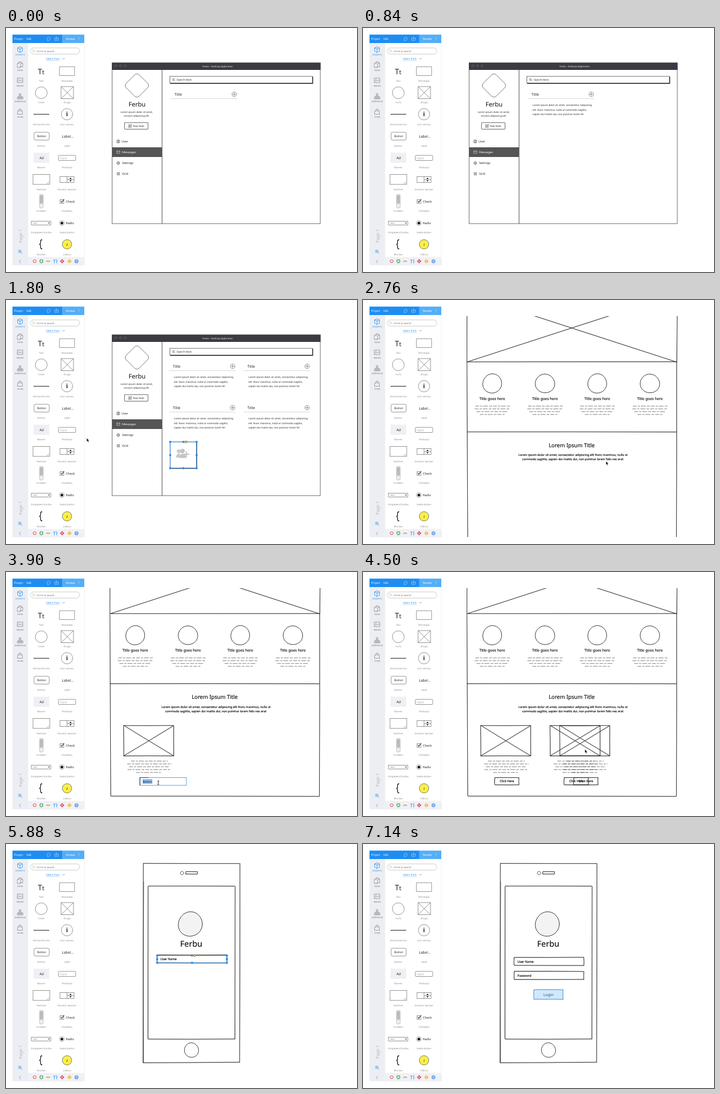
Recreate the animation shown at these times as an HTML page. Size 650 by 454 pixels, loop 7.2 s.

```html
<!DOCTYPE html>
<html lang="en">
<head>
<meta charset="utf-8">
<title>Wireframe demo</title>
<style>
html, body { margin: 0; width: 100%; height: 100%; overflow: hidden; background: #fff; }
svg { display: block; width: 100vw; height: 100vh; font-family: "Noto Sans", "Open Sans", sans-serif; text-rendering: geometricPrecision; }
</style>
</head>
<body>
<svg id="stage" viewBox="0 0 650 454" xmlns="http://www.w3.org/2000/svg"></svg>
<script>
const LOOP = 7200, INK = '#222', BLUE = '#2089ea', BRAND = 'Ferbu';

// Markup helpers
const tag = (name, attrs, style = '') => `<${name} ${attrs} ${style}/>`;
const stroke = (c = INK, w = .8, f = 'none') => `fill="${f}" stroke="${c}" stroke-width="${w}"`;
const rect = (x, y, w, h, s, r = 0) => tag('rect', `x="${x}" y="${y}" width="${w}" height="${h}" rx="${r}"`, s);
const circ = (x, y, r, s) => tag('circle', `cx="${x}" cy="${y}" r="${r}"`, s);
const path = (d, s = stroke()) => tag('path', `d="${d}"`, s);
const fill = c => `fill="${c}"`;
const text = (x, y, size, str, color = INK, anchor = 'start', extra = '') =>
  `<text x="${x}" y="${y}" font-size="${size}" fill="${color}" text-anchor="${anchor}" ${extra}>${str}</text>`;
const mid = (x, y, size, str, color, extra) => text(x, y, size, str, color, 'middle', extra);
const hand = (x, y, size, str, anchor = 'middle') => text(x, y, size, str, '#111', anchor, 'stroke="#111" stroke-width=".18"');
const group = (id, body) => `<g id="${id}">${body}</g>`;
const MEDIUM = 'font-weight="500"';

// Hand-drawn strokes
let seed = 7;
const rnd = () => (seed = seed * 16807 % 2147483647) / 2147483647;
const jit = a => (rnd() * 2 - 1) * a;
function rough(x1, y1, x2, y2, c = INK, w = .9) {
  const d = a => `M${x1 + jit(a)} ${y1 + jit(a)}Q${(x1 + x2) / 2 + jit(.8)} ${(y1 + y2) / 2 + jit(.8)} ${x2 + jit(a)} ${y2 + jit(a)}`;
  return path(d(.3), stroke(c, w)) + path(d(.6), stroke(c, w * .4));
}
function roughRect(x, y, w, h, c, lw) {
  return rough(x, y, x + w, y, c, lw) + rough(x + w, y, x + w, y + h, c, lw) +
    rough(x + w, y + h, x, y + h, c, lw) + rough(x, y + h, x, y, c, lw);
}
function roughCirc(x, y, r, f = 'none') {
  const ph = rnd() * 6;
  let d = '';
  for (let i = 0; i <= 40; i++) {
    const a = i / 40 * Math.PI * 2, q = r * (1 + .02 * Math.sin(2 * a + ph) + .01 * Math.sin(3 * a));
    d += `${i ? 'L' : 'M'}${(x + q * Math.cos(a)).toFixed(2)} ${(y + q * Math.sin(a)).toFixed(2)}`;
  }
  return path(d + 'Z', stroke(INK, .95, f));
}
function squiggle(cx, y, w) {
  let d = `M${cx - w / 2} ${y}`;
  for (let x = 0; x < w; x += 2) d += `q.5 ${jit(.7).toFixed(2)} 1 0t1 0`;
  return path(d, stroke('#333', .75) + ' stroke-dasharray="7 2 4 1.8 9 2.2 5 2"');
}

function palette() {
  const grey = '#777', thin = stroke('#555', .65), icon = stroke('#777', .7), white = stroke('#e6f3ff', .55);
  let s = rect(12, 12, 133, 429, fill('#fff')) + rect(12, 28, 29, 413, fill('#eceef3')) +
    rect(41, 427, 104, 14, fill('#f0f1f6')) + path('M145 28V441M41 427H145M12 441H145', stroke('#e2e4ea', .6)) +
    rect(12, 12.3, 92, 15.7, fill('#1e8df2')) + rect(104, 12.3, 41, 15.7, fill('#55aef8'));
  s += text(15, 21.7, 5.1, 'Project', '#fff') + text(38, 21.7, 5.1, 'Edit', '#fff') + text(111, 21.7, 5.1, 'Review', '#fff');
  s += path('M77.3 22.3a3 2.7 0 1 1 1.8 .4l-2.3 1ZM91.3 18h-1v5h6.4v-5h-1M93.5 15.5v5m-1.8-1.8 1.8 1.8 1.8-1.8M134 17.5l2 2-2 2', white);
  // Side rail
  s += path('M26 35l4.5 2v6L26 45.5l-4.5-2.5v-6ZM21.5 37l4.5 2 4.5-2M26 39v6.5', stroke(BLUE, .8));
  s += path('M24 66v-3h4l3 3v6h-5M21 65.5h4l2 2v6h-6ZM28 63v3h3', icon);
  s += rect(21, 93, 10, 8.5, icon) + path('M21 100l3-3 2 2 2.5-3 2.5 3', icon) + circ(24, 95.5, .7, fill(grey));
  s += path('M24.5 122h3v3h-3ZM21 129h3v3h-3ZM24.7 129h3v3h-3ZM28.5 129h3v3h-3ZM26 125v4M22.5 129v-2h7.5v2', icon);
  s += path('M22 154h8l.8 6.5h-9.6ZM24 154v-1.5a2 2 0 0 1 4 0v1.5', icon);
  [['ELEMENTS', 51.3], ['PAGES', 80.3], ['IMAGES', 109.3], ['WORKFLOW', 138.3], ['STORE', 167.3]]
    .forEach(([l, y], i) => s += mid(26.3, y, 3.6, l, i ? '#666' : BLUE));
  s += text(0, 0, 8, 'Page 1', '#b4b6bc', 'middle', 'transform="translate(29.5 387) rotate(-90)"');
  s += circ(25.5, 415.5, 2.6, stroke(BLUE, .7)) + path('M27.5 417.5l2.5 2.5M24.3 415.5h2.4M25.5 414.3v2.4M27.5 431.5l-3 3 3 3', stroke(BLUE, .7));
  // Search
  s += rect(45.5, 37, 91, 11.5, stroke('#aaa', .6), 5.7) + circ(51, 42.5, 1.6, stroke('#999', .5)) + path('M52.2 43.7l1.5 1.5', stroke('#999', .5));
  s += text(56.5, 44.6, 4.4, 'Ctrl+K to Search', '#666') + text(74, 59, 4.8, 'Select Pack', BLUE) +
    path('M74 60.8h25', stroke(BLUE, .5) + ' stroke-dasharray="1 .6"') + path('M104.5 56l2.2 2.2 2.2-2.2', stroke(BLUE, .7));
  // Elements
  const names = ['Text', 'Rectangle', 'Circle', 'Image', 'Horizontal Line', 'Icon Library', 'Button', 'Label', 'Banner',
    'TextInput', 'TextArea', 'Numeric Spinner', 'ScrollBar', 'CheckBox', 'Dropdown/Combo', 'Radio Button', 'Bracket', 'Callout'];
  names.forEach((n, i) => s += mid(i % 2 ? 113 : 65.3, 100 + (i >> 1) * 40.35, 4.4, n, '#888'));
  s += text(59, 86, 14, 'T', INK, 'start', MEDIUM) + text(67, 86, 11, 't', INK, 'start', MEDIUM);
  s += rect(99, 72, 28, 16.5, thin) + circ(65.3, 120.5, 11, thin) + rect(102, 109, 23, 22.5, thin) + path('M102 109l23 22.5m0-22.5l-23 22.5', thin);
  s += path('M51 160.5H80', stroke(INK, 1.1)) + circ(113, 160.5, 10.5, thin) + mid(113, 164.3, 11, 'i', INK, 'font-weight="600"');
  s += rect(52, 194, 28, 14.5, thin, 2.5) + mid(66, 203.3, 5.2, 'Button', INK, MEDIUM) + text(103.5, 204, 6.5, 'Label...');
  s += rect(51, 232, 29, 19, fill('#eef0f4')) + mid(66, 243.5, 6.3, 'Ad') + rect(97, 237, 32, 9.5, thin, 1.5) + text(100, 243.5, 5.1, 'Input', '#aaa');
  s += rect(50, 272.5, 31, 18.5, thin) + path('M79.5 286l-4 4m4-2l-2 2', stroke('#888', .6));
  s += rect(100, 276.5, 26, 11, thin) + path('M113 276.5v11m0-5.5h13', thin) + path('M117.5 281l2-2.7 2 2.7ZM117.5 283.3l2 2.7 2-2.7Z', fill(INK));
  s += rect(62, 309.5, 7, 25.5, stroke('#999', .6, '#eee'), 3) + rect(62.5, 311, 6, 16, fill('#bbb'), 2.5);
  s += rect(100, 319.5, 7, 7, thin) + path('M101.5 322l2 2.5 4-6', stroke(INK, 1.1)) + text(111, 325, 5.8, 'Check');
  s += rect(47, 359.5, 36, 7, thin) + text(50, 364, 3, 'Select', '#555') + path('M78 362h3l-1.5 2.2Z', fill(INK));
  s += circ(103.5, 363, 4.3, thin) + circ(103.5, 363, 2.5, fill('#111')) + text(111, 365, 5.6, 'Radio');
  s += path('M67 394q-3 0-3 3v2.5q0 2.5-2 3 2 .5 2 3v2.5q0 3 3 3', stroke('#111', 1.3));
  s += circ(113, 402.5, 8.7, stroke('#555', .8, '#fdf04a')) + mid(113, 404.6, 5.5, '2');
  // Toolbar
  s += rect(50.5, 431.5, 5, 5, stroke('#e04646', 1), 1) + circ(65.5, 434, 2.8, stroke('#35a04a', 1.2)) + path('M74.5 434h7', stroke('#eb9b2d', 1.8));
  s += text(87, 437.5, 9.5, 'T', BLUE, 'start', MEDIUM) + path('M94 430.5v7', stroke(BLUE, 1));
  [[0, -2.3], [-2.3, 0], [2.3, 0], [0, 2.3]].forEach(([x, y]) => s += path(`M${104 + x} ${432.3 + y}l1.7 1.7-1.7 1.7-1.7-1.7Z`, fill('#d8324e')));
  return s + circ(117.5, 434, 2.8, stroke('#ecaa3c', 1, '#f8d27c')) + circ(130.5, 434, 2.8, stroke('#2f6fe0', 1.1)) + circ(130.5, 434, 1, fill('#2f6fe0'));
}

function noteBody() {
  return ['Lorem ipsum dolor sit amet, consectetur adipiscing', 'elit. Nunc maximus, nulla ut commodo sagittis,',
    'sapien dui mattis dui, non pulvinar lorem fel'].map((l, i) => text(314, 145.4 + i * 8.2, 4.57, l)).join('');
}
function noteHead() {
  return text(312, 125.5, 7, 'Title', INK, 'start', MEDIUM) + circ(422.7, 123.3, 4.2, stroke('#555', .7)) +
    path('M420 123.3h5.4M422.7 120.6v5.4', stroke('#555', .7)) + path('M305 131.5H428', stroke('#bbb', .6));
}

function desktop() {
  const fine = stroke(INK, .6);
  let s = rect(196.5, 65, 385.5, 299, stroke('#555', .9, '#fff')) + rect(196, 64.5, 386.5, 13.5, fill('#3b3b43'));
  [203.5, 212, 220.5].forEach(x => s += circ(x, 70.3, 1.9, stroke('#777', .6)));
  s += mid(392, 72.8, 4.3, BRAND + ' - Desktop Application', '#eee') + path('M289 78V364', stroke('#444', 1));
  s += rect(-17, -17, 34, 34, stroke('#555', .8) + ' transform="translate(242.5 107) rotate(45)"', 6);
  s += mid(242.8, 145.5, 11.5, BRAND, '#111') + mid(242, 157.5, 4.5, 'Lorem ipsum dolor sit amet,') + mid(242, 165.3, 4.5, 'consect adipiscing elit.');
  s += rect(219.5, 176, 43.5, 12.3, stroke('#333'), .8) + text(235, 184, 4.5, 'New Note', INK, 'start', MEDIUM) +
    path('M230 180h-3v5h5v-3M228.5 183.5l.5-1.5 3-3 1 1-3 3Z', fine);
  s += rect(196.5, 222, 92.5, 18, fill('#555'));
  s += circ(207.8, 211, 3, fine) + circ(207.8, 210.2, 1.1, fine) + path('M205.8 213.2q2-2 4 0', fine);
  s += path('M205 228.7h6v4.6h-6Zl3 2.6 3-2.6', stroke('#ddd', .6));
  s += circ(207.8, 251.3, 2.7, stroke(INK, 1) + ' stroke-dasharray="1.3 .8"') + circ(207.8, 251.3, 1.3, fine);
  for (let i = 0; i < 3; i++) s += path(`M205.3 ${269.2 + i * 2}h5.5`, stroke(INK, 1) + ' stroke-dasharray="1.4 .6"');
  [['User', 211], ['Messages', 231], ['Settings', 251], ['Grid', 271]].forEach(([l, y], i) =>
    s += text(i ? 215 : 214, y + 2.2, 5.5, l, i == 1 ? '#fff' : INK, 'start', MEDIUM));
  s += rect(303.5, 90, 264, 12.5, stroke('#444', .8)) + path('M304 103H568V90.5', stroke(INK, 1.3));
  s += circ(310, 95.7, 1.7, fine) + path('M311.2 97l1.8 1.8', fine) + text(316, 98.2, 4.9, 'Search Here');
  s += group('head', noteHead()) + group('body', noteBody());
  for (const id of ['note2', 'note3', 'note4']) s += group(id, noteHead() + noteBody());
  s += group('tile', rect(304, 264, 49, 49, stroke('#555', .7, '#fff')) + path('M304 313.3H353.3V264', stroke(INK, 1.2)));
  s += group('people', circ(320, 281.5, 3.7, fill('#ccc')) + circ(327, 281, 4.2, fill('#c4c4c4')) +
    path('M315 293q0-6 5-7h3q-3 3-3 7ZM320.5 294q0-7 6.5-8 6.5 1 6.5 8Z', fill('#c4c4c4')) + path('M334 281.5v11M328.5 287h11', stroke('#c4c4c4', 2.2)));
  return s + rect(0, 0, 0, 0, 'id="marquee" ' + stroke(BLUE, .6, '#2089ea18'));
}

function cardParts() {
  const img = roughRect(218, 285.7, 92.5, 56.5) + rough(218, 285.7, 310.5, 342.2) + rough(310.5, 285.7, 218, 342.2);
  const lines = [67, 81, 74, 80, 48].map((w, i) => squiggle(265, 351.8 + i * 5.3, w)).join('');
  const button = roughRect(244, 382.5, 45, 13.5) + hand(266.5, 391.4, 5.7, 'Click Here');
  return [img, lines, button];
}

function landing() {
  let s = rough(193, -49, 192.3, 77.5) + rough(192.3, 77.5, 194, 417) + rough(582, -49, 581, 77.5) + rough(581, 77.5, 580.3, 417) +
    rough(194, 417.3, 580.3, 417.3) + rough(193, -49, 581, -49) + rough(193, 77.6, 581, 77.3) +
    rough(193, 77.8, 581, -48.5) + rough(581, 77.8, 193, -48.5) + rough(192.5, 207.7, 580.5, 208);
  [239.3, 337, 433.8, 531.3].forEach(x => {
    s += roughCirc(x, 117.8, 17.7) + hand(x, 148, 6.9, 'Title goes here');
    [63, 65, 58, 46].forEach((w, i) => s += squiggle(x, 159.8 + i * 5.2, w));
  });
  s += group('intro', hand(386.5, 236, 10, 'Lorem Ipsum Title') +
    hand(389, 252.8, 5.44, 'Lorem ipsum dolor sit amet, consectetur adipiscing elit Nunc maximus, nulla ut') +
    hand(388.5, 260.8, 5.44, 'commodo sagittis, sapien dui mattis dui, non pulvinar lorem felis nec erat'));
  const [img, lines, button] = cardParts();
  s += group('img', img) + group('lines', lines) + group('button', button);
  s += group('edit', rect(248, 382.5, 86, 14.5, stroke('#4f9fe0', 1, '#fff')) + path('M248 397V382.5h16', stroke(INK, .9)) +
    rect(253, 385.5, 18, 8.5, 'id="mark" ' + fill('#86b9e6')) + '<text id="typed" x="253.5" y="392" font-size="5.2" fill="#222"></text>');
  for (const id of ['card2', 'card3']) s += group(id, img + lines + button);
  return s;
}

function phone() {
  let s = rough(254, 36, 433, 36.5) + rough(433, 36, 433, 406) + rough(433, 406, 254, 407) + rough(254.5, 407, 254, 36) + rough(255, 70, 253.5, 407, INK, .5);
  s += roughRect(263, 78.5, 161, 284.5) + roughCirc(326, 54, 3) + roughRect(333, 51.5, 21.5, 4.5) + roughCirc(343.5, 383.5, 13.3);
  s += group('avatar', roughCirc(341.3, 149, 22.5, 'url(#hatch)')) + group('name', hand(343, 191, 15, BRAND));
  [['user', 'User Name', 211], ['pass', 'Password', 237]].forEach(([id, l, y]) =>
    s += group(id, roughRect(280, y, 129, 15) + hand(286, y + 9.6, 5.7, l, 'start')));
  return s + group('login', rect(316.5, 271, 54, 18, 'id="tint" fill="url(#blueHatch)"') + group('plain', roughRect(316.5, 271, 54, 18)) +
    group('blue', roughRect(316.5, 271, 54, 18, '#3d8fdc')) + mid(343.5, 283.3, 7.3, 'Login', '#2a5c90'));
}

const hatch = (id, bg, c) => `<pattern id="${id}" width="2.4" height="2.4" patternUnits="userSpaceOnUse" patternTransform="rotate(45)">` +
  rect(0, 0, 2.4, 2.4, fill(bg)) + rect(0, 0, .6, 2.4, fill(c)) + '</pattern>';
const handles = [[0, 0], [.5, 0], [1, 0], [0, .5], [1, .5], [0, 1], [.5, 1], [1, 1]];

document.getElementById('stage').innerHTML =
  `<defs>${hatch('hatch', '#fafafa', '#dedede')}${hatch('blueHatch', '#e2f0fc', '#a5cff3')}<clipPath id="view">${rect(150, 30, 500, 411, '')}</clipPath></defs>` +
  rect(0, 0, 650, 454, fill('#fff')) + palette() + group('desktop', desktop()) +
  `<g clip-path="url(#view)">${group('landing', landing())}</g>` + group('phone', phone()) +
  group('sel', rect(0, 0, 1, 1, 'id="frame" ' + stroke(BLUE, .8)) + handles.map(() => circ(0, 0, 2, fill(BLUE))).join('') +
    circ(0, 0, 2, stroke('#8a6a10', .8, '#f5c52c'))) +
  group('arrow', path('M0 0V6.5L1.6 5.2 2.7 7.7 3.8 7.2 2.7 4.8H4.6Z', fill('#111') + ' stroke="#fff" stroke-width=".3"')) +
  group('beam', path('M-1.5-3.2h3M0-3.2v6.4M-1.5 3.2h3', stroke('#111', .9)));

// Time helpers
const ui = {};
document.querySelectorAll('[id]').forEach(e => ui[e.id] = e);
const show = (id, on) => ui[id].style.display = on ? '' : 'none';
const at = (id, x, y) => ui[id].setAttribute('transform', `translate(${x} ${y})`);
const set = (e, o) => { for (const k in o) e.setAttribute(k, o[k]); };
const ramp = (t, a, b) => { const p = Math.min(1, Math.max(0, (t - a) / (b - a))); return p * p * (3 - 2 * p); };
const within = (t, a, b) => t >= a && t < b;

function drag(id, t, a, b, dx, dy) {
  const k = 1 - ramp(t, a, b);
  show(id, t >= a);
  at(id, dx * k, dy * k);
}

function select(x, y, w, h) {
  set(ui.frame, { x, y, width: w, height: h });
  ui.sel.querySelectorAll('circle').forEach((c, i) => {
    const [u, v] = handles[i] || [.5, 0];
    set(c, { cx: x + w * u + (i > 7 ? 4.8 : 0), cy: y + h * v });
  });
}

// Cursor stops: time, x, y
const moves = [[90, 190, 170], [240, 66, 82], [300, 66, 82], [540, 366, 153], [780, 400, 190],
  [870, 301, 111], [1010, 431, 168], [1050, 366, 124], [1110, 363, 124], [1230, 501, 124], [1260, 430, 135], [1380, 430, 212],
  [1440, 113, 82], [1560, 328, 289], [1690, 328, 289], [1800, 149.5, 257], [1920, 113, 160], [2160, 113, 160],
  [2170, 400, 220], [2400, 450, 300], [3300, 450, 300], [3360, 113, 122], [3500, 264, 314], [3560, 65, 82], [3680, 265, 364],
  [3740, 66, 202], [3840, 290, 390], [3870, 282, 392], [4130, 282, 392], [4200, 265, 330], [4400, 393, 330], [4450, 393, 330],
  [4660, 514, 330], [4860, 369, 281], [5340, 369, 281], [5400, 65, 122], [5520, 341, 149], [5580, 343, 188], [5640, 113, 242],
  [5820, 345, 214], [6060, 345, 219], [6240, 345, 245], [6330, 66, 202], [6540, 343, 280], [6690, 343, 280], [6930, 491, 330]];

function cursor(t) {
  let i = 1;
  while (i < moves.length - 1 && moves[i][0] < t) i++;
  const [a, x1, y1] = moves[i - 1], [b, x2, y2] = moves[i], k = ramp(t, a, b);
  return [x1 + (x2 - x1) * k, y1 + (y2 - y1) * k];
}

function update(t) {
  const scene = t < 2160 ? 'desktop' : t < 5340 ? 'landing' : 'phone';
  for (const s of ['desktop', 'landing', 'phone']) show(s, s == scene);
  const [x, y] = cursor(t);
  let box = null;

  if (scene == 'desktop') {
    const dx = -3 * ramp(t, 1050, 1110), right = 138 * ramp(t, 1110, 1230), down = 77 * ramp(t, 1260, 1380);
    at('head', dx, 0);
    drag('body', t, 300, 540, -300, -72);
    if (t >= 540) at('body', dx, 0);
    for (const [id, on, nx, ny] of [['note2', 1110, right, 0], ['note3', 1260, 0, down], ['note4', 1260, right, down]]) {
      show(id, t >= on);
      at(id, nx - 3, ny);
    }
    drag('tile', t, 1440, 1560, -215, -207);
    show('people', t >= 1650);
    if (within(t, 540, 740)) box = [312, 138.5, 115, 25];
    if (within(t, 1560, 2100)) box = [304, 264, 49, 49];
    show('marquee', within(t, 870, 1040));
    set(ui.marquee, { x: 301, y: 111, width: Math.max(0, x - 301), height: Math.max(0, y - 111) });
  }

  if (scene == 'landing') {
    at('landing', 0, t < 4000 ? 84 * (1 - ramp(t, 2440, 3040)) : Math.min(84, Math.max(0, (t - 4860) * 22 / 120)));
    show('intro', t >= 2400);
    drag('img', t, 3360, 3500, -151, -192);
    drag('lines', t, 3560, 3680, -200, -282);
    drag('edit', t, 3740, 3840, -224, -188);
    show('edit', within(t, 3740, 4130));
    show('button', t >= 4130);
    show('mark', within(t, 3860, 3930));
    ui.typed.textContent = t < 3930 ? 'Button' : 'Click Here'.slice(0, Math.floor((t - 3930) / 15));
    show('card2', t >= 4200);
    at('card2', 128.5 * ramp(t, 4200, 4400), 0);
    show('card3', t >= 4450);
    at('card3', 128.5 + 120.5 * ramp(t, 4450, 4660), 0);
    if (within(t, 3500, 3550)) box = [218, 285.7, 92.5, 56.5];
  }

  if (scene == 'phone') {
    const settle = ramp(t, 5890, 5960), blue = t >= 6660;
    drag('avatar', t, 5400, 5520, -276, -29);
    show('name', t >= 5580);
    drag('user', t, 5640, 5820, -232, 23);
    if (t >= 5820) at('user', 0, -4.5 * (1 - settle));
    show('pass', t >= 6060);
    at('pass', 0, -26 * (1 - ramp(t, 6060, 6240)));
    drag('login', t, 6330, 6540, -277, -78);
    show('blue', blue);
    show('tint', blue);
    show('plain', !blue);
    if (within(t, 5820, 6030)) box = [280, 207.5 + 4 * settle, 129, 13.5];
    if (within(t, 6540, 6720)) box = [316.5, 271, 54, 18];
  }

  show('sel', box);
  if (box) select(...box);
  const hidden = t < 90 || within(t, 790, 870) || within(t, 5840, 6000) || t >= 6950;
  const typing = within(t, 3870, 4130);
  show('arrow', !hidden && !typing);
  show('beam', typing);
  at('arrow', x, y);
  at('beam', x, y);
}

const start = performance.now();
function tick() {
  update((performance.now() - start) % LOOP);
  requestAnimationFrame(tick);
}
tick();
</script>
</body>
</html>
```
